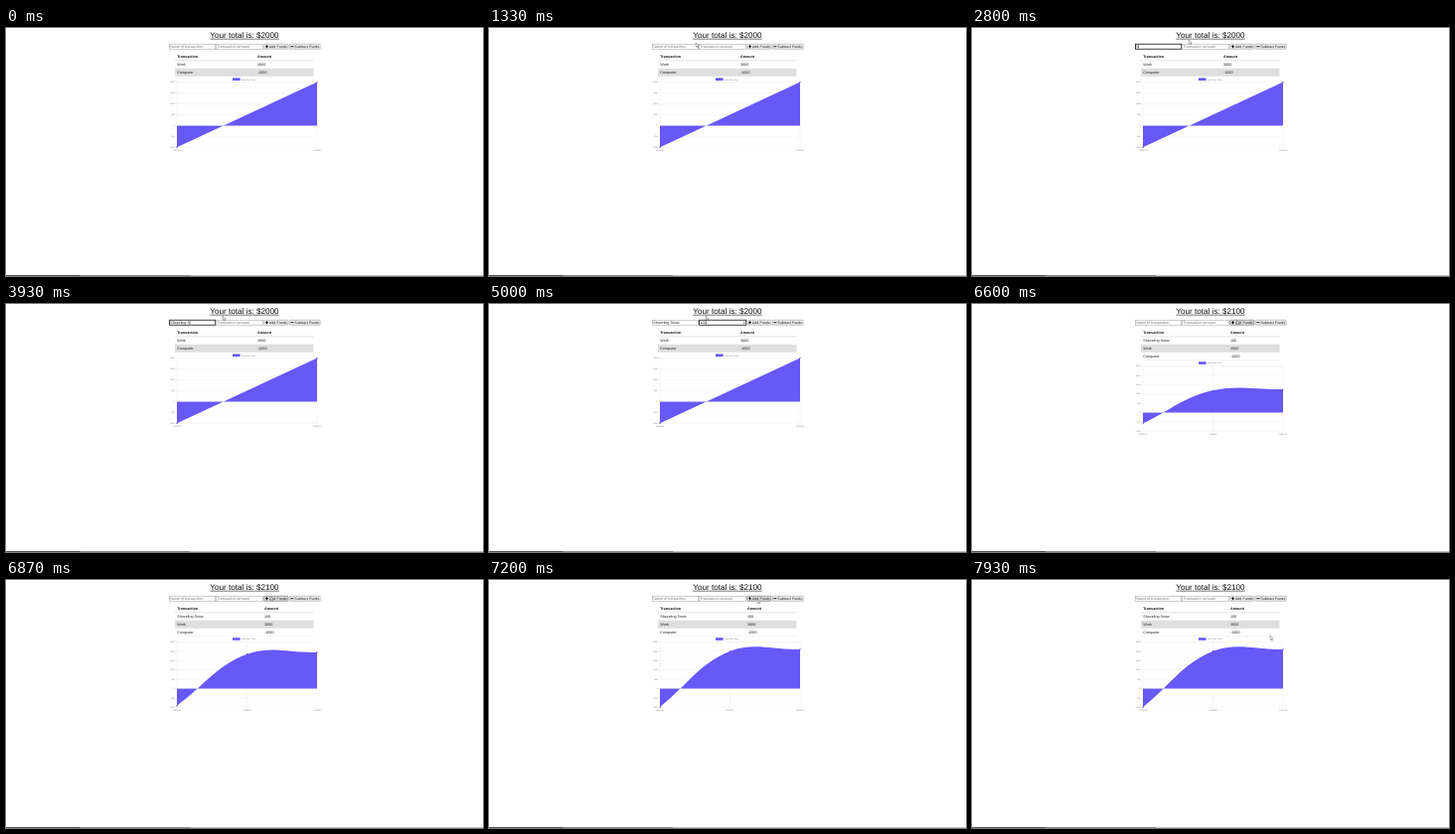
An HTML page for the animation above (8 s loop, 480 px wide and 250 px high).

```html
<!DOCTYPE html>
<html lang="en">
<head>
<meta charset="utf-8">
<title>Budget tracker</title>
<style>
  html, body { margin: 0; width: 100%; height: 100%; overflow: hidden; background: #fff; }
  svg { display: block; width: 480px; height: 250px; }
  text { font-family: "Liberation Sans", Arial, sans-serif; font-size: 3.7px; fill: #222; text-rendering: geometricPrecision; white-space: pre; }
  .title { font-size: 8.15px; fill: #111; }
  .bold { font-weight: bold; fill: #111; }
  .hint { fill: #757575; }
  .tick { font-size: 2.1px; fill: #777; }
</style>
</head>
<body>
<svg id="stage" viewBox="0 0 480 250"></svg>
<script>
const LOOP = 8000, SUBMIT = 6400, GROW = 1000;
const FILL = '#6758f8';
const stage = document.getElementById('stage');

const rect = (x, y, w, h, fill, more = '') =>
  `<rect x="${x}" y="${y}" width="${w}" height="${h}" fill="${fill}" ${more}/>`;
const text = (x, y, s, cls = '', anchor = 'start', more = '') =>
  `<text x="${x}" y="${y}" class="${cls}" text-anchor="${anchor}" ${more}>${s}</text>`;
const line = (x1, y1, x2, y2, color, w = 0.3) =>
  `<path d="M${x1} ${y1}L${x2} ${y2}" stroke="${color}" stroke-width="${w}"/>`;

function table(rows, amountX) {
  let out = text(172.3, 30.1, 'Transaction', 'bold') + text(amountX, 30.1, 'Amount', 'bold') +
    line(170, 32.8, 309.5, 32.8, '#ccc', 0.5);
  rows.forEach(([name, amount], i) => {
    const y = 33 + i * 7.9;
    if (i % 2) out += rect(170, y, 139.5, 7.7, '#dedede');
    out += line(170, y + 7.8, 309.5, y + 7.8, '#ddd', 0.3) +
      text(172.3, y + 5, name) + text(amountX, y + 5, amount);
  });
  return out;
}

function chart({ id, legendY, top, step, max, dates, area, points }) {
  const count = (max + 1000) / 500, bottom = top + count * step;
  const zero = top + max / 500 * step;
  let out = rect(228, legendY, 7.6, 2.6, FILL) +
    text(236.8, legendY + 2.1, 'Total Over Time', 'tick');
  for (let i = 0; i <= count; i++) {
    const y = top + i * step;
    out += line(170, y, 313, y, '#e4e4e4') + text(169.7, y + 0.7, max - i * 500, 'tick', 'end');
  }
  dates.forEach((d, i) => {
    const x = 172 + 141 * i / (dates.length - 1);
    out += line(x, top, x, bottom + 1.2, '#e0e0e0') + text(x, bottom + 3.9, d, 'tick', 'middle');
  });
  const dots = points.map(([x, y]) => `<circle cx="${x}" cy="${y - zero}" r=".7" fill="#5548c8"/>`);
  return out + `<g id="${id}" data-zero="${zero}" transform="translate(0 ${zero})">` +
    `<path d="${area}" transform="translate(0 ${-zero})" fill="${FILL}"/>${dots.join('')}</g>` +
    line(172, zero, 313, zero, '#cbc8e8', 0.25);
}

const before = table([['Work', '3000'], ['Computer', '-1000']], 253) + chart({
  id: 'areaA', legendY: 50.4, top: 54.6, step: 10.95, max: 2000,
  dates: ['1/2/2020', '1/3/2020'],
  area: 'M172 98.4V120.3L313 54.6V98.4Z',
  points: [[172, 120.3], [313, 54.6]]
});
const after = table([['Shoveling Snow', '100'], ['Work', '3000'], ['Computer', '-1000']], 260) + chart({
  id: 'areaB', legendY: 58.2, top: 62.4, step: 9.4, max: 2500,
  dates: ['1/2/2020', '1/3/2020', '1/4/2020'],
  area: 'M172 109.4V128.2C200.2 105.6 210.8 84.9 242.5 71.8C267.2 62.4 284.8 70.7 313 69.9V109.4Z',
  points: [[172, 128.2], [242.5, 71.8], [313, 69.9]]
});

const field = (id, x, w, hint) =>
  rect(x, 16.2, w, 5, '#fff', `id="${id}Box" stroke="#999" stroke-width=".5"`) +
  text(x + 0.8, 20, hint, 'hint', 'start', `id="${id}Hint"`) +
  text(x + 0.8, 20, '', '', 'start', `id="${id}Text"`) +
  rect(0, 16.9, 0.35, 3.7, '#000', `id="${id}Caret"`);
const button = (id, x, w, icon, label) =>
  rect(x, 16.2, w, 5, '#efefef', `id="${id}" rx=".6" stroke="#888" stroke-width=".5"`) +
  `<path d="${icon}" stroke="#000" stroke-width=".9"/>` + text(x + 5, 20, label);

stage.innerHTML =
  text(240, 10, '', 'title', 'middle', 'id="total"') +
  rect(205.3, 10.8, 69.4, 0.6, '#222') +
  field('name', 164.4, 46.4, 'Name of transaction') +
  field('sum', 211.6, 47.2, 'Transaction amount') +
  `<path id="spin" d="M256 18.3l.8-1.1 .8 1.1zM256 19.1l.8 1.1 .8-1.1z" fill="#555"/>` +
  button('add', 259.8, 24, 'M261 18.7h3M262.5 17.2v3', 'Add Funds') +
  button('sub', 285.2, 31, 'M286.4 18.7h3', 'Subtract Funds') +
  `<g id="before">${before}</g><g id="after">${after}</g>` +
  rect(0, 249, 74, 1, '#555') + rect(74, 249, 111, 1, '#8c8c8c') + rect(185, 249, 295, 1, '#c4c4c4') +
  `<path id="mouse" d="M0 0v4.2l1-.9 .8 1.7 .6-.3-.8-1.6h1.4z" fill="#fff" stroke="#333" stroke-width=".35"/>`;

const el = {};
stage.querySelectorAll('[id]').forEach(n => el[n.id] = n);
const show = (n, on) => n.setAttribute('visibility', on ? 'visible' : 'hidden');

// Key press times, one per character
const nameKeys = [2800, 3000, 3070, 3130, 3200, 3330, 3470, 3530, 3600, 3670, 3930, 4070, 4130, 4270];
const sumKeys = [4730, 4870, 5000];
const mousePath = [
  [530, 41, 82], [800, 128, 40], [1070, 208, 15], [1330, 208, 15], [1530, 218.3, 12],
  [5530, 218.3, 12], [5930, 242, 13.5], [6330, 266.4, 16.4], [6900, 266.4, 16.4],
  [7270, 271, 20], [7930, 300, 56]
];

function drawField(id, t, focusAt, blurAt, keys, value) {
  const typed = keys.filter(k => k <= t).length;
  const sent = t >= SUBMIT, focused = t >= focusAt && t < blurAt;
  const label = el[id + 'Text'], caret = el[id + 'Caret'], box = el[id + 'Box'];
  const s = sent ? '' : value.slice(0, typed);
  label.textContent = s;
  show(el[id + 'Hint'], !s);
  box.setAttribute('stroke', focused ? '#111' : '#999');
  box.setAttribute('stroke-width', focused ? 0.8 : 0.5);
  const last = typed ? keys[typed - 1] : focusAt;
  show(caret, focused && Math.floor((t - last) / 500) % 2 === 0);
  caret.setAttribute('x', +label.getAttribute('x') + (s ? label.getComputedTextLength() : 0));
  return focused;
}

function drawMouse(t) {
  show(el.mouse, t >= mousePath[0][0]);
  let i = mousePath.findIndex(p => p[0] > t);
  if (i < 0) i = mousePath.length - 1;
  if (!i) return;
  const [t0, x0, y0] = mousePath[i - 1], [t1, x1, y1] = mousePath[i];
  const k = Math.min(1, (t - t0) / (t1 - t0));
  el.mouse.setAttribute('transform', `translate(${x0 + (x1 - x0) * k} ${y0 + (y1 - y0) * k})`);
}

function draw(t) {
  const sent = t >= SUBMIT;
  el.total.textContent = 'Your total is: $' + (sent ? 2100 : 2000);
  show(el.before, !sent);
  show(el.after, sent);

  drawField('name', t, 1370, 4400, nameKeys, 'Shoveling Snow');
  show(el.spin, drawField('sum', t, 4400, 6300, sumKeys, '100'));

  const hover = t >= 6200 && t < 7270;
  el.add.setAttribute('fill', hover ? '#e2e2e2' : '#efefef');
  el.add.setAttribute('stroke', hover && t >= 6300 ? '#444' : '#888');

  // Quartic ease-out, growing from the zero line
  const p = Math.max(0, Math.min(1, (t - SUBMIT) / GROW));
  const grown = 1 - (1 - p) ** 4;
  el.areaB.setAttribute('transform', `translate(0 ${el.areaB.dataset.zero}) scale(1 ${grown})`);
  drawMouse(t);
}

const start = performance.now();
function tick() {
  draw((performance.now() - start) % LOOP);
  requestAnimationFrame(tick);
}
tick();
</script>
</body>
</html>
```
